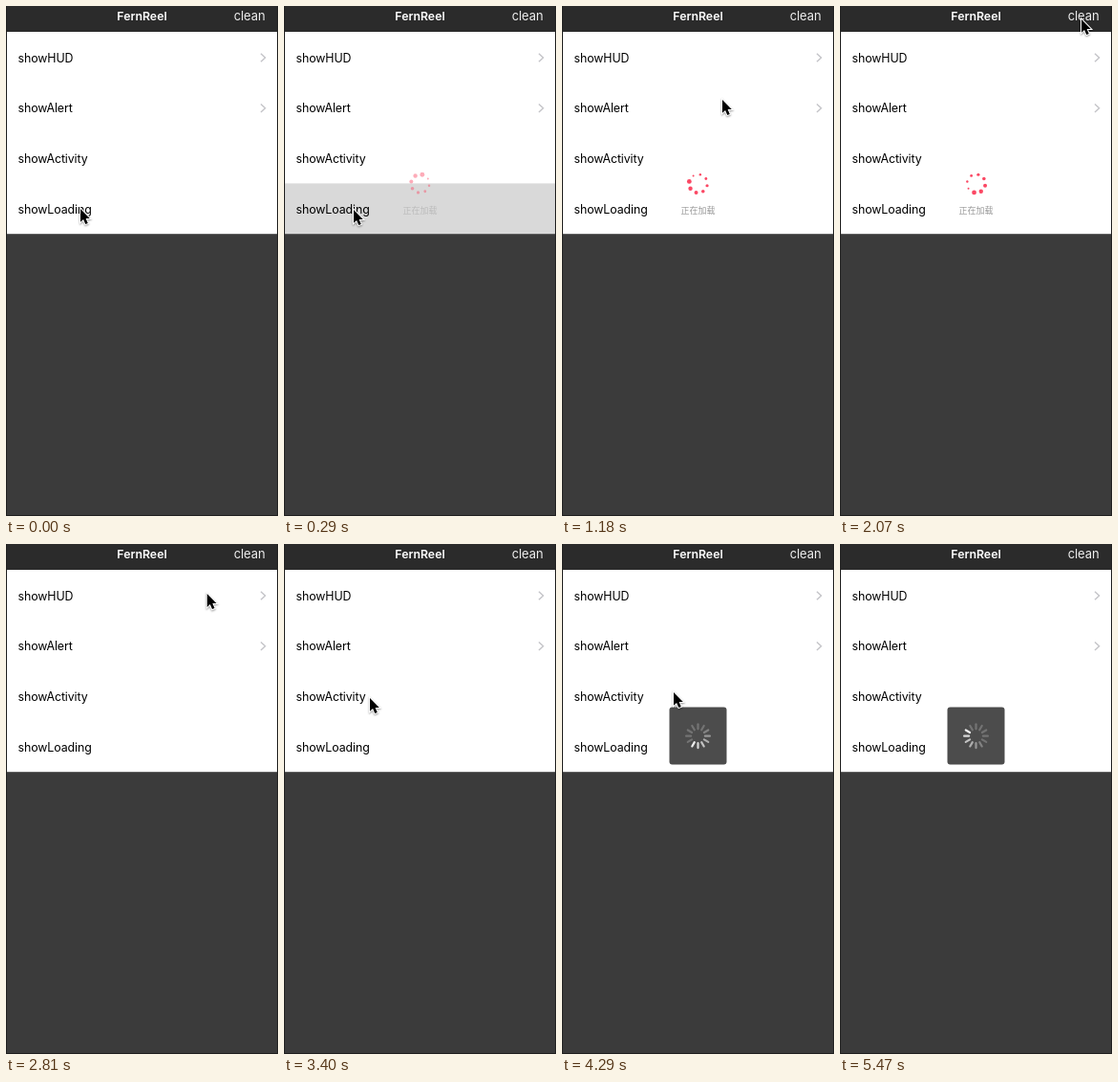
Write an HTML page with a canvas that moves like this. It is 285 px wide and 533 px high and loops after 5570 ms.

```html
<!DOCTYPE html>
<html lang="zh-CN">
<meta charset="utf-8">
<style>
html, body { margin: 0; width: 100%; height: 100%; overflow: hidden; background: #3b3b3b; }
canvas { display: block; }
</style>
<canvas id="stage" width="285" height="533"></canvas>
<script>
const ctx = document.getElementById('stage').getContext('2d');
const LOOP = 5570, STEP = 147.84, LEAD = 9;
const ROW = 52.8, TOP = 27;
const rows = ['showHUD', 'showAlert', 'showActivity', 'showLoading'];
const arrow = new Path2D('M0 0V13.8L3.1 10.9L5.3 16L7.8 15L5.6 10H9.8Z');

// Pointer keys: step, x, y
const pointer = [
  [0, 78, 212], [2, 73, 213], [4, 74, 212], [8, 168, 98], [13, 253, 14], [17, 253, 14],
  [23, 90, 161], [25, 90, 161], [29, 117, 155], [30, 122, 172], [32, 150, 402], [34, 165, 560]
];

const clamp = v => Math.max(0, Math.min(1, v));

function pointerAt(n) {
  let i = pointer.findIndex(k => k[0] > n);
  if (i < 0) return pointer[pointer.length - 1].slice(1);
  const [a, ax, ay] = pointer[i - 1], [b, bx, by] = pointer[i];
  const u = (n - a) / (b - a), e = u * u * (3 - 2 * u);
  return [ax + (bx - ax) * e, ay + (by - ay) * e];
}

function box(x, y, w, h, color) {
  ctx.fillStyle = color;
  ctx.fillRect(x, y, w, h);
}

function text(s, x, y, font, color, align = 'left', spacing = 0) {
  ctx.font = font;
  ctx.fillStyle = color;
  ctx.textAlign = align;
  ctx.letterSpacing = spacing + 'px';
  ctx.fillText(s, x, y);
}

function chevron(y) {
  ctx.strokeStyle = '#c4c4c8';
  ctx.lineWidth = 1.4;
  ctx.lineCap = 'butt';
  ctx.beginPath();
  ctx.moveTo(267, y - 4.3);
  ctx.lineTo(271.6, y);
  ctx.lineTo(267, y + 4.3);
  ctx.stroke();
}

// Row highlight: on at the press, then a short fade
function highlight(row, n, on) {
  const a = n < on ? 0 : clamp(1 - (n - on - 1) / 2);
  if (a) box(1, TOP + row * ROW, 283, ROW, `rgba(0,0,0,${0.15 * a})`);
}

function loading(n, alpha) {
  ctx.save();
  ctx.globalAlpha = alpha;
  ctx.fillStyle = '#fb4864';
  for (let i = 0; i < 8; i++) {
    const a = (-122 + 45 * (n - 8 + i)) * Math.PI / 180;
    ctx.beginPath();
    ctx.arc(142.7 + 9.6 * Math.cos(a), 185.6 + 9.6 * Math.sin(a), 1 + i * 0.2, 0, 7);
    ctx.fill();
  }
  text('正在加载', 142.5, 217, '9px "Noto Sans CJK SC", "Noto Sans CJK", sans-serif', '#999', 'center');
  ctx.restore();
}

function activity(n, alpha) {
  ctx.save();
  ctx.globalAlpha = alpha;
  ctx.fillStyle = 'rgba(0,0,0,.7)';
  ctx.beginPath();
  ctx.roundRect(112.5, 170.5, 60, 60, 3);
  ctx.fill();
  const head = Math.floor((n * STEP - LEAD + 130) / (1000 / 12));
  ctx.translate(142.5, 200.7);
  ctx.strokeStyle = '#fff';
  ctx.lineWidth = 2.2;
  ctx.lineCap = 'round';
  for (let i = 0; i < 12; i++) {
    ctx.save();
    ctx.rotate((head - i) * Math.PI / 6);
    ctx.globalAlpha = alpha * Math.max(0.22, 0.9 - i * 0.12);
    ctx.beginPath();
    ctx.moveTo(7.4, 0);
    ctx.lineTo(12.4, 0);
    ctx.stroke();
    ctx.restore();
  }
  ctx.restore();
}

function drawPointer(n) {
  ctx.save();
  ctx.translate(...pointerAt(n));
  ctx.lineJoin = 'miter';
  ctx.strokeStyle = '#fff';
  ctx.lineWidth = 2;
  ctx.shadowColor = 'rgba(0,0,0,.4)';
  ctx.shadowBlur = 2;
  ctx.shadowOffsetY = 1;
  ctx.stroke(arrow);
  ctx.shadowColor = 'transparent';
  ctx.fillStyle = '#000';
  ctx.fill(arrow);
  ctx.restore();
}

function draw(n) {
  box(0, 0, 285, 533, '#3b3b3b');
  box(0, 0, 285, TOP, '#2b2b2b');
  box(1, TOP, 283, 4 * ROW, '#fff');
  highlight(3, n, 1);
  highlight(2, n, 24);
  text('FernReel', 142.5, 15, '600 12.3px Inter, sans-serif', '#fff', 'center');
  text('clean', 271.5, 15, '13px Inter, sans-serif', '#eee', 'right', -0.1);
  rows.forEach((s, i) => {
    const y = 54 + i * ROW;
    text(s, 12.5, y + 4.6, '12.4px Inter, sans-serif', '#000', 'left', -0.1);
    if (i < 2) chevron(y);
  });
  if (n >= 2 && n < 17) loading(n, n < 3 ? 0.45 : 1);
  if (n >= 24) activity(n, n < 25 ? 0.6 : 1);
  box(0, 0, 1, 533, '#1e1e1e');
  box(284, 0, 1, 533, '#1e1e1e');
  box(0, 532, 285, 1, '#1e1e1e');
  drawPointer(n);
}

const start = performance.now();
function tick() {
  const t = (performance.now() - start) % LOOP;
  draw(Math.min(37, Math.floor((t + LEAD) / STEP)));
  requestAnimationFrame(tick);
}
tick();
</script>
</html>
```
